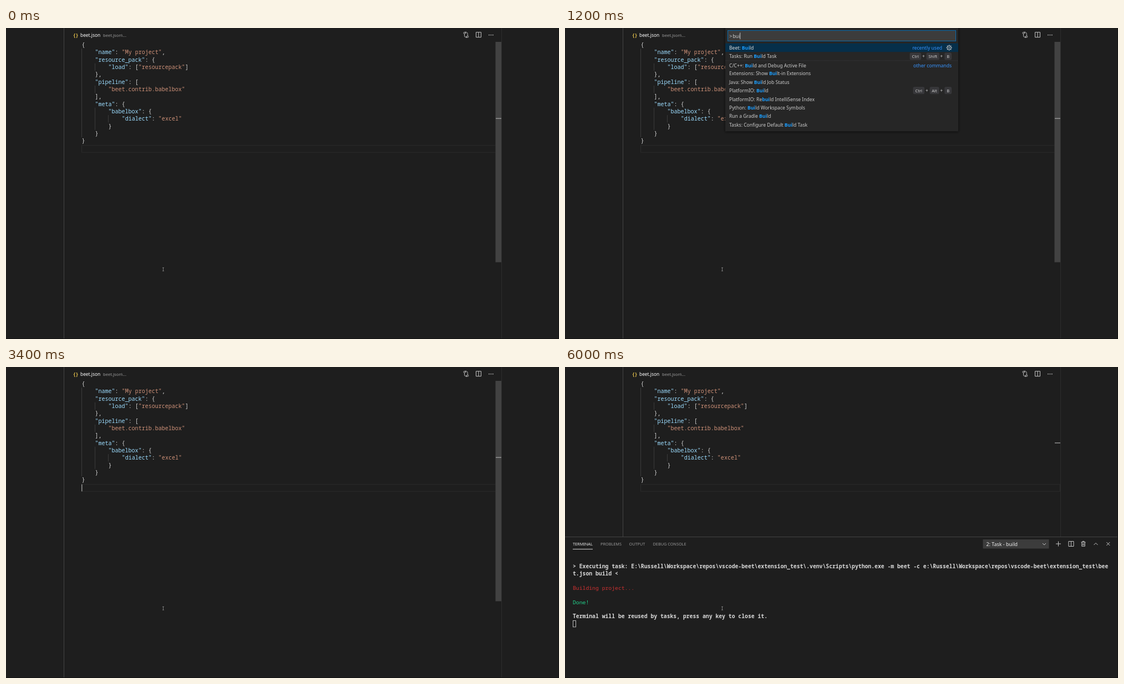
These frames come from a looping animation (997 px wide and 561 px high, 6200 ms). An HTML page:

```html
<!DOCTYPE html>
<html lang="en">
<head>
<meta charset="utf-8">
<title>Build task</title>
<style>
html, body { margin: 0; width: 100%; height: 100%; overflow: hidden; background: #1e1e1e; }
svg { display: block; width: 100%; height: 100%; }
text { white-space: pre; }
.ui { font-family: "Noto Sans", "Open Sans", sans-serif; }
.mono { font-family: "Noto Sans Mono", "DejaVu Sans Mono", monospace; }
</style>
</head>
<body>
<svg id="stage" viewBox="0 0 997 561">
  <defs>
    <filter id="shade" x="-5%" y="-10%" width="110%" height="125%">
      <feDropShadow dx="0" dy="1" stdDeviation="2.5" flood-color="#000" flood-opacity=".7"/>
    </filter>
  </defs>
  <rect width="997" height="561" fill="#1e1e1e"/>
  <g id="editor"></g>
  <g id="live"></g>
  <g id="pointer"></g>
</svg>
<script>
const LOOP = 6200, STEP = 200;
const $ = id => document.getElementById(id);
const esc = s => s.replace(/&/g, '&amp;').replace(/</g, '&lt;').replace(/>/g, '&gt;');
const rect = (x, y, w, h, fill, more = '') =>
  `<rect x="${x}" y="${y}" width="${w}" height="${h}" fill="${fill}" ${more}/>`;
const path = (d, stroke, width = 1, more = '') =>
  `<path d="${d}" fill="none" stroke="${stroke}" stroke-width="${width}" ${more}/>`;
const raw = (cls, x, y, size, fill, body, more = '') =>
  `<text class="${cls}" x="${x}" y="${y}" font-size="${size}" fill="${fill}" ${more}>${body}</text>`;
const ui = (x, y, s, fill = '#ccc', size = 8.57, more = '') => raw('ui', x, y, size, fill, esc(s), more);

// ---- editor ----
const CODE = [
  '{',
  '    "name": "My project",',
  '    "resource_pack": {',
  '        "load": ["resourcepack"]',
  '    },',
  '    "pipeline": [',
  '        "beet.contrib.babelbox"',
  '    ],',
  '    "meta": {',
  '        "babelbox": {',
  '            "dialect": "excel"',
  '        }',
  '    }',
  '}'
];
const LINE = 13.33, CELL = 6.02;

function codeLine(s, i) {
  const y = 33.9 + i * LINE;
  return [...s.matchAll(/"[^"]*"(?=(:)?)|[^\s"]+/g)].map(m => {
    const color = m[0][0] !== '"' ? '#d4d4d4' : m[1] ? '#9cdcfe' : '#ce9178';
    return raw('mono', 136.4 + m.index * CELL, y, 10.03, color, m[0]);
  }).join('');
}

function guide(level, from, to) {
  const x = 136.5 + level * 24;
  return path(`M${x} ${23.8 + from * LINE}V${23.8 + to * LINE}`, '#3b3b3b');
}

function splitIcon(x, y, c) {
  return path(`M${x - 4.5} ${y - 4.5}h9v9h-9zM${x} ${y - 4.5}v9`, c, 1);
}

function drawEditor() {
  const c = '#c5c5c5';
  return path('M104.5 0V561', '#444') + path('M893.5 0V561', '#2c2c2c') +
    raw('mono', 120.8, 15.6, 8.6, '#e3c04b', '{', 'font-weight="700"') +
    raw('mono', 125.4, 15.6, 8.6, '#e3c04b', '}', 'font-weight="700"') +
    ui(134, 16.2, 'beet.json', '#fff', 8.4) +
    ui(175, 16.2, 'beet.json\\...', '#9d9d9d', 7.65) +
    path('M826.5 10.5v3.5q0 2.5 2.5 2.5h2M829.5 14.8l1.7 1.7-1.7 1.7M832.3 14v-3.5q0-2.5-2.5-2.5h-2M829.3 6.3l-1.7 1.7 1.7 1.7', c, .9) +
    `<g fill="none" stroke="${c}" stroke-width=".9"><circle cx="826.5" cy="9" r="1.5"/><circle cx="832.3" cy="15.6" r="1.5"/></g>` +
    splitIcon(852, 12.2, c) +
    [871, 874.4, 877.8].map(x => `<circle cx="${x}" cy="12.6" r=".9" fill="${c}"/>`).join('') +
    guide(0, 1, 13) + guide(1, 3, 4) + guide(1, 6, 7) + guide(1, 9, 12) + guide(2, 10, 11) +
    CODE.map(codeLine).join('');
}

// ---- command palette ----
const RECENT = [
  'Beet: Build', 'View: Reset Zoom', 'Beet: Link World', 'Git: Push', 'Git: Merge Branch...',
  'Git: Checkout to...', 'Git: Pull', 'Git: Delete Branch...', 'Git: Delete Tag', 'Git: Push Tags',
  'Git: Create Tag', 'Git: Remove Remote', 'Git: Rename Branch...', 'Git: Fetch'
];
const MATCHES = [
  'Beet: Build', 'Tasks: Run Build Task', 'C/C++: Build and Debug Active File',
  'Extensions: Show Built-in Extensions', 'Java: Show Build Job Status', 'PlatformIO: Build',
  'PlatformIO: Rebuild IntelliSense Index', 'Python: Build Workspace Symbols',
  'Run a Gradle Build', 'Tasks: Configure Default Build Task'
];
const FILES = ['beet.json', 'beet-release.json'];
const ROW = 15.42, rowY = i => 39 + i * ROW;

// Highlights the first place where the query, or its longest leading part, occurs.
function marked(s, query) {
  for (let n = query.length; n > 0; n--) {
    const at = s.toLowerCase().indexOf(query.slice(0, n));
    if (at >= 0) return esc(s.slice(0, at)) +
      `<tspan fill="#1b9dff" font-weight="700">${esc(s.slice(at, at + n))}</tspan>` + esc(s.slice(at + n));
  }
  return esc(s);
}

function keys(row, list) {
  const y = rowY(row);
  return list.map(([name, x, w], i) =>
    rect(x, y - 9.4, w, 12, '#37373a', 'rx="1.5" stroke="#414144" stroke-width=".6"') +
    ui(x + w / 2, y - .6, name, '#ccc', 7.5, 'text-anchor="middle"') +
    (i ? ui(x - 5.8, y, '+', '#ccc', 8, 'text-anchor="middle"') : '')).join('');
}

function gear(x, y) {
  let teeth = '';
  for (let i = 0; i < 8; i++) {
    const a = i * Math.PI / 4, c = Math.cos(a), s = Math.sin(a);
    teeth += `M${x + 3.4 * c} ${y + 3.4 * s}L${x + 5 * c} ${y + 5 * s}`;
  }
  return path(teeth, '#c5c5c5', 1.5) +
    `<g fill="none" stroke="#c5c5c5" stroke-width=".9"><circle cx="${x}" cy="${y}" r="3.5"/><circle cx="${x}" cy="${y}" r="1.3"/></g>`;
}

function palette(items, query) {
  const h = 32 + items.length * ROW;
  return rect(289, -6, 420, h + 6, '#252526', 'filter="url(#shade)"') +
    rect(293.5, 4.5, 411, 19, '#3c3c3c', 'stroke="#0a6bad"') +
    rect(289, 27.7, 420, ROW, '#062f4a') +
    items.map((s, i) => raw('ui', 296, rowY(i) + (items === MATCHES && i === 2 ? .8 : 0), 8.57,
      i ? '#ccc' : '#e2e2e2', marked(s, query))).join('');
}

function commands(query) {
  const items = query ? MATCHES : RECENT;
  let out = palette(items, query) +
    ui(296.3, 17.6, '>', '#ccc', 9) +
    ui(302.2, 17.6, query, '#ccc', 8.8, 'id="query"') +
    ui(680, 39, 'recently used', '#3794ff', 8.57, 'text-anchor="end"') + gear(692.6, 35.6);
  if (query) {
    out += path('M289 58.9H709', '#3f3f46', .8, 'stroke-dasharray="1 1"') +
      ui(697, rowY(2) + .8, 'other commands', '#3794ff', 8.57, 'text-anchor="end"') +
      keys(1, [['Ctrl', 622, 19.5], ['Shift', 652, 22.5], ['B', 684.7, 11.8]]) +
      keys(5, [['Ctrl', 628, 19.5], ['Alt', 658, 16], ['B', 684.7, 11.8]]);
  } else {
    out += keys(1, [['Ctrl', 625.8, 19.5], ['NumPad0', 655.8, 40.7]]);
  }
  return out + rect(302.2, 8.3, .9, 12, '#ccc', 'id="caret"');
}

function picker(caret) {
  return palette(FILES, '') + ui(296, 17.6, 'Pick beet config file', '#a0a0a0', 8.6) +
    (caret ? rect(296, 8, 1, 12, '#ccc') : '');
}

// ---- terminal panel ----
const HOME = ':\\Russell\\Workspace\\repos\\vscode-beet\\extension_test\\';
const OUTPUT = [
  [4000, 0, `> Executing task: E${HOME}.venv\\Scripts\\python.exe -m beet -c e${HOME}bee`, '#d8d8d8', 700],
  [4000, 1, 't.json build <', '#d8d8d8', 700],
  [4400, 3, 'Building project...', '#cd3131', 400],
  [4800, 5, 'Done!', '#23d18b', 400],
  [5000, 7, 'Terminal will be reused by tasks, press any key to close it.', '#d8d8d8', 700]
];

function terminal(t) {
  const c = '#c5c5c5';
  const row = t < 4000 ? 0 : t < 4400 ? 3 : t < 4800 ? 4 : t < 5000 ? 6 : 8;
  const tabs = [['TERMINAL', 14], ['PROBLEMS', 64], ['OUTPUT', 115.5], ['DEBUG CONSOLE', 158.5]];
  return rect(0, 306, 997, 255, '#1e1e1e') + path('M0 306.5H997', '#434343') +
    tabs.map(([s, x], i) => ui(x, 322, s, i ? '#969696' : '#e7e7e7', 7.3)).join('') +
    path('M14 328.6H50', '#e7e7e7', .9) +
    rect(753.5, 311, 119, 16.5, '#3c3c3c') + ui(759.5, 322.7, '2: Task - build', '#f0f0f0', 8.9) +
    path('M861 318l3 3 3-3', c) +
    path('M889.5 314.5v9M885 319h9', c) + splitIcon(912.5, 319, c) +
    path('M930.5 316h8M933 316v-1.6h3V316M931.7 316v7.3h5.6V316M933.5 318v3.7M935.5 318v3.7', c, 1) +
    path('M953.5 321l3.5-3.5 3.5 3.5', c) + path('M976.3 316l6 6M982.3 316l-6 6', c) +
    OUTPUT.filter(o => t >= o[0]).map(([, r, s, fill, weight]) =>
      raw('mono', 14, 362.8 + r * 12.95, 9.75, fill, esc(s), `font-weight="${weight}"`)).join('') +
    rect(14.5, 353.9 + row * 12.95, 5, 11.4, 'none', 'stroke="#c8c8c8" stroke-width=".9"');
}

// ---- timeline ----
const within = (t, a, b) => t >= a && t < b;

// One letter per step from 800 ms, the last two together.
const typed = t => t >= 1400 ? 'build' : 'bui'.slice(0, Math.max(0, (t - 600) / STEP));

function scene(t) {
  const open = t >= 3600;
  let out = rect(136.5, 211.8, open ? 756 : 752, 12.4, 'none', 'stroke="#2b2b2b"');
  if (!open) out += rect(882.5, 25, 10.5, 397.5, '#424242');
  out += rect(883, open ? 136.3 : 162.5, 10, 1.3, '#a0a0a0');
  if (within(t, 3200, 4000) || within(t, 4600, 5000) || within(t, 5600, 6000))
    out += rect(136.2, 211.6, 1.2, 12.8, '#aeafad');
  if (within(t, 400, 1600)) out += commands(typed(t));
  if (within(t, 1600, 3200)) out += picker(!within(t, 2200, 2600) && t < 3000);
  if (open) out += terminal(t);
  return out;
}

let shown = -1;
function update(ms) {
  const t = Math.floor(ms % LOOP / STEP) * STEP;
  if (t === shown) return;
  shown = t;
  $('live').innerHTML = scene(t);
  const caret = $('caret');
  if (caret && $('query').textContent)
    caret.setAttribute('x', 302.2 + $('query').getComputedTextLength());
}

$('editor').innerHTML = drawEditor();
$('pointer').innerHTML = path('M282 432.4h3M282 438.2h3M283.5 432.4v5.8', '#a0a0a0', .7) +
  rect(996, 0, 1, 561, '#121212') + rect(0, 560, 997, 1, '#121212');

let start;
function tick(now) {
  start ??= now;
  update(now - start);
  requestAnimationFrame(tick);
}
update(0);
requestAnimationFrame(tick);
</script>
</body>
</html>
```
